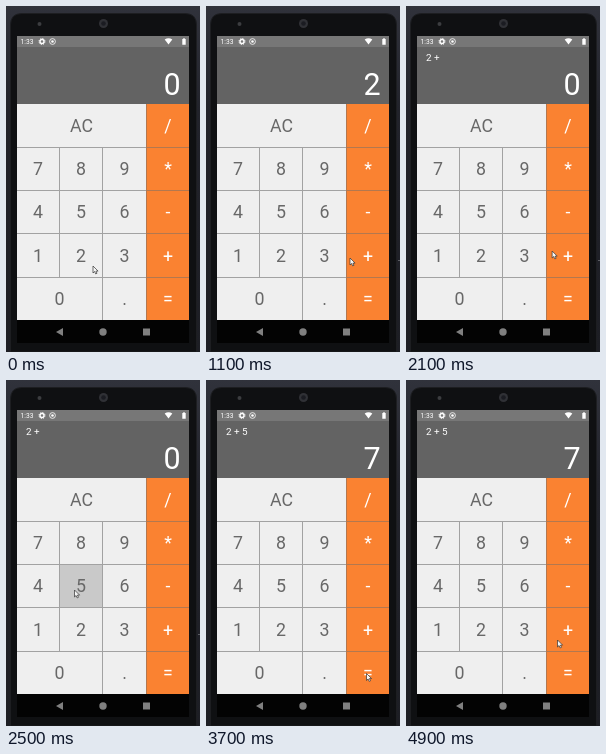
An HTML page that plays this animation: 194x346 px, repeating every 5000 ms.

```html
<!DOCTYPE html>
<html lang="en">
<head>
<meta charset="utf-8">
<title>Calculator</title>
<style>
  html, body { margin: 0; width: 100%; height: 100%; overflow: hidden; background: #1d1e24; }
  svg { display: block; width: 194px; height: 346px; }
  text { font-family: Roboto, "Open Sans", sans-serif; white-space: pre; }
  .key { font-size: 17.8px; text-anchor: middle; fill: #686868; }
  .op { fill: #fff; }
</style>
</head>
<body>
<svg viewBox="0 0 194 346">
  <defs>
    <linearGradient id="side" x2="0" y2="1">
      <stop offset="0" stop-color="#30323b"/>
      <stop offset=".3" stop-color="#22232b"/>
      <stop offset="1" stop-color="#1d1e24"/>
    </linearGradient>
    <clipPath id="pad"><rect x="11" y="98" width="172" height="216"/></clipPath>
  </defs>
  <rect width="194" height="346" fill="url(#side)"/>
  <path d="M4.500 346V19Q4.500 7.500 16 7.500H179Q190.500 7.500 190.500 19V346Z" fill="#0f1012" stroke="#1d1e21"/>
  <circle cx="33.500" cy="18" r="2" fill="#3c3d40"/>
  <circle cx="97.500" cy="17.500" r="4.500" fill="#303136"/>
  <circle cx="97.500" cy="17.500" r="2.300" fill="#1b1c22"/>

  <rect x="11" y="30" width="172" height="11" fill="#777"/>
  <rect x="11" y="41" width="172" height="57" fill="#636363"/>
  <g fill="#fff">
    <text x="14.500" y="38.300" font-size="6.700">1:33</text>
    <circle cx="36" cy="35.500" r="2" fill="none" stroke="#fff" stroke-width="1.400"/>
    <circle cx="36" cy="35.500" r="3" fill="none" stroke="#fff" stroke-width="1" stroke-dasharray="1.200 1.156"/>
    <circle cx="46.500" cy="35.500" r="2.900" fill="none" stroke="#fff" stroke-width=".8"/>
    <circle cx="46.500" cy="35.500" r="1.300"/>
    <path d="M158.700 33.500Q162.500 30.900 166.300 33.500L162.500 38.500Z"/>
    <path d="M176.300 33H177.200V32.200H178.800V33H179.700V38.700H176.300Z"/>
    <text id="sum" x="20" y="54.500" font-size="9.900"></text>
    <text id="out" x="174.700" y="88.700" font-size="30.500" text-anchor="end"></text>
  </g>

  <g id="keys" clip-path="url(#pad)"></g>

  <rect x="11" y="314" width="172" height="23" fill="#030303"/>
  <g fill="#808080">
    <path d="M50 326L57 322V330Z"/>
    <circle cx="97" cy="326" r="3.700"/>
    <rect x="137" y="322.500" width="7" height="7"/>
  </g>
  <path id="tick" d="M192 254.500H194" stroke="#5c5d63"/>
  <path id="cursor" d="M0 0V7L1.600 5.500L2.700 7.900L4 7.300L2.900 5.100H5.100Z" fill="#f6f6f6" stroke="#333" stroke-width=".7" stroke-linejoin="round"/>
</svg>
<script>
const LOOP = 5000, STEP = 100;
const $ = id => document.getElementById(id);
// grid lines sit on pixel centres; the outer ones fall outside the clip
const COLS = [10.5, 53.5, 96.5, 140.5, 183.5];
const ROWS = [97.5, 141.5, 184.5, 227.5, 271.5, 314.5];

// label, row, column, columns spanned
const LAYOUT = [
  ['AC', 0, 0, 3], ['/', 0, 3, 1],
  ['7', 1, 0, 1], ['8', 1, 1, 1], ['9', 1, 2, 1], ['*', 1, 3, 1],
  ['4', 2, 0, 1], ['5', 2, 1, 1], ['6', 2, 2, 1], ['-', 2, 3, 1],
  ['1', 3, 0, 1], ['2', 3, 1, 1], ['3', 3, 2, 1], ['+', 3, 3, 1],
  ['0', 4, 0, 2], ['.', 4, 2, 1], ['=', 4, 3, 1]
];

const PRESSES = [['2', 400, 700], ['+', 1500, 1900], ['5', 2400, 2700], ['=', 3400, 3600]];
const SCREENS = [[0, '', '0'], [700, '', '2'], [1600, '2 +', '0'], [2700, '2 +', '5'], [3600, '2 + 5', '7']];
const PATH = [
  [0, 87, 260], [400, 75, 251], [700, 75, 251], [1100, 144, 252], [1300, 160.5, 251.5],
  [2000, 160.5, 251.5], [2400, 68.5, 210], [2700, 68.5, 210], [3000, 131, 254.5],
  [3300, 160.5, 293.5], [3900, 160.5, 293.5], [4900, 151.5, 260]
];
const TICKS = [[700, 1400], [2100, 3200]];

function add(parent, tag, attrs, label) {
  const el = document.createElementNS('http://www.w3.org/2000/svg', tag);
  for (const name in attrs) el.setAttribute(name, attrs[name]);
  if (label) el.textContent = label;
  return parent.appendChild(el);
}

const pads = {};
for (const [label, row, col, span] of LAYOUT) {
  const x = COLS[col], y = ROWS[row];
  const w = COLS[col + span] - x, h = ROWS[row + 1] - y, op = col === 3;
  pads[label] = {
    op,
    el: add($('keys'), 'rect', { x, y, width: w, height: h, stroke: op ? '#b3784f' : '#a2a2a2' })
  };
  add($('keys'), 'text', { x: x + w / 2, y: y + h / 2 + 6.3, class: op ? 'key op' : 'key' }, label);
}

const within = (t, from, to) => t >= from && t < to;

function position(t) {
  const i = PATH.findIndex(p => p[0] > t);
  if (i < 0) return PATH[PATH.length - 1].slice(1);
  const a = PATH[i - 1], b = PATH[i];
  const k = (t - a[0]) / (b[0] - a[0]), ease = k * k * (3 - 2 * k);
  return [1, 2].map(n => a[n] + (b[n] - a[n]) * ease);
}

function draw(t) {
  for (const label in pads) {
    const { el, op } = pads[label];
    const down = PRESSES.some(([key, from, to]) => key === label && within(t, from, to));
    el.setAttribute('fill', op ? (down ? '#ce6c2b' : '#fa8231') : (down ? '#c9c9c9' : '#efefef'));
  }
  const [, sum, out] = SCREENS.filter(s => s[0] <= t).pop();
  $('sum').textContent = sum;
  $('out').textContent = out;
  $('cursor').setAttribute('transform', `translate(${position(t)})`);
  $('tick').style.opacity = TICKS.some(([from, to]) => within(t, from, to)) ? 1 : 0;
}

const start = performance.now();
function frame() {
  const t = (performance.now() - start) % LOOP;
  draw(Math.floor(t / STEP) * STEP);
  requestAnimationFrame(frame);
}
frame();
</script>
</body>
</html>
```
